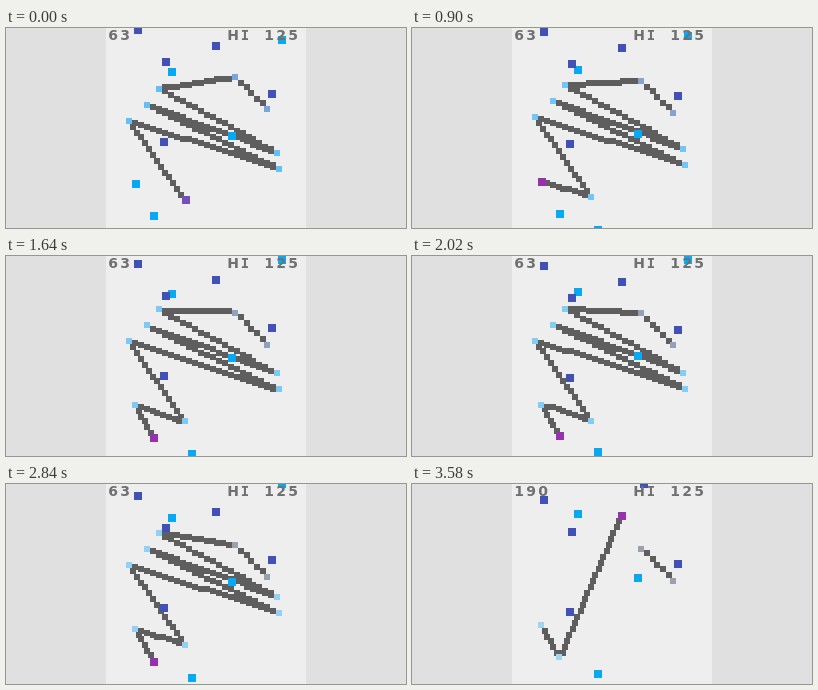
An HTML page for the animation above (3600 ms loop, 400 px wide and 200 px high).

```html
<!DOCTYPE html>
<html lang="en">
<head>
<meta charset="utf-8">
<title>Line jumper</title>
<style>
html, body { margin: 0; width: 100%; height: 100%; overflow: hidden; background: #e0e0e0; }
svg { display: block; width: 400px; height: 200px; }
path, rect { shape-rendering: crispEdges; }
text { font: bold 14px "DejaVu Sans", sans-serif; fill: #707070; text-anchor: middle; white-space: pre; }
.serif { font-family: "DejaVu Sans Mono", monospace; }
.soft { filter: blur(0.6px); }
</style>
</head>
<body>
<svg viewBox="0 0 400 200">
  <rect width="400" height="200" fill="#e0e0e0"/>
  <rect x="100" width="200" height="200" fill="#eee"/>
  <g id="gains"></g>
  <g class="soft">
    <path id="dust" fill="#686868"/>
    <path id="sparks" fill="#b05c6c"/>
    <path id="lines" fill="#5e5e5e"/>
    <path id="upNodes"/>
    <path id="downNodes"/>
    <path id="up" fill="#08a8f2"/>
    <path id="down" fill="#4251b6"/>
    <path id="player"/>
  </g>
  <text id="score" x="107 119 131" y="12"></text>
  <text x="227 239 251 263 275 287" y="12">H<tspan class="serif">I</tspan> 125</text>
</svg>
<script>
const LOOP = 3600, TICK = 20, STEP = 485;
const JUMPS = [160, 1300, 2860];
const BURST = JUMPS[2];
const UP = -1, DOWN = 1;
const $ = id => document.getElementById(id);

// One unit is two pixels. Every item drifts one unit per STEP.
const item = ([x, y, dir]) => ({ x: x + 0.25, y, dir });
const chain = [
  [131, 41, DOWN], [115, 25, DOWN], [77, 30, UP], [136, 62, UP],
  [71, 38, UP], [137, 70, UP], [62, 46, UP], [90, 86, UP],
  [65, 78, UP], [74, 94, UP], [105, 9, DOWN]
].map(item);
const blocks = [
  [66, 1, DOWN], [80, 17, DOWN], [133, 33, DOWN], [79, 57, DOWN], [116, -7, DOWN],
  [83, 22, UP], [113, 54, UP], [93, 102, UP], [138, 5.5, UP]
].map(item);
const START = 7, CUT_FROM = 1, CUT_TO = 7;

const yAt = (p, t) => p.y + 0.5 + p.dir * (t / STEP - 0.366);
const square = (x, y, size) => {
  const s = size * 2;
  return `M${Math.floor(x - size / 2) * 2} ${Math.floor(y - size / 2) * 2}h${s}v${s}h${-s}z`;
};
const at = (p, t, size) => square(p.x, yAt(p, t), size);

function line(a, b, t) {
  const ay = yAt(a, t), dx = b.x - a.x, dy = yAt(b, t) - ay;
  const n = Math.ceil(Math.max(Math.abs(dx), Math.abs(dy)) / 3);
  let d = "";
  for (let i = 0; i <= n; i++) d += square(a.x + dx * i / n, ay + dy * i / n, 3);
  return d;
}

let seed = 29;
const rand = (lo, hi) => {
  seed = (seed * 16807) % 2147483647;
  return lo + (hi - lo) * seed / 2147483647;
};

function scatter(i, density, speed) {
  const a = chain[i], b = chain[i + 1];
  const ay = yAt(a, BURST), dx = b.x - a.x, dy = yAt(b, BURST) - ay;
  const length = Math.round(Math.hypot(dx, dy) * density);
  return Array.from({ length }, () => {
    const k = rand(0, 1), angle = rand(0, Math.PI * 2), v = rand(0.4, 1) * speed;
    return {
      x: a.x + dx * k,
      y: ay + dy * k,
      vx: Math.cos(angle) * v, vy: Math.sin(angle) * v,
      life: rand(10, 20)
    };
  });
}

const gains = [], dust = [];
for (let i = CUT_FROM; i <= CUT_TO; i++) {
  const a = chain[i], b = chain[i + 1];
  const label = "+" + 2 ** (i - CUT_FROM);
  const mid = a.x + b.x;
  const el = document.createElementNS("http://www.w3.org/2000/svg", "text");
  el.textContent = label;
  el.setAttribute("x", [...label].map((c, k) => mid + (k - (label.length - 1) / 2) * 12).join(" "));
  $("gains").append(el);
  gains.push({ el, y: (yAt(a, BURST) + yAt(b, BURST)) / 2 });
  dust.push(...scatter(i, 0.26, 0.7));
}
const sparks = scatter(chain.length - 2, 0.26, 0.8);

function spray(list, n) {
  if (n < 0) return "";
  const reach = (1 - 0.98 ** n) / 0.02;
  return list.filter(p => n < p.life)
    .map(p => square(p.x + p.vx * reach, p.y + p.vy * reach, 1)).join("");
}

const mix = (a, b, k) => `rgb(${a.map((v, i) => Math.round(v + (b[i] - v) * k))})`;
const draw = (id, d) => $(id).setAttribute("d", d);
const paint = (id, color) => $(id).setAttribute("fill", color);

function render(t) {
  const head = START + JUMPS.filter(j => t >= j).length;
  const cut = t >= BURST;
  const n = (t - BURST) / TICK;
  const alive = i => i >= 0 && i < head && !(cut && i >= CUT_FROM && i <= CUT_TO);

  let lines = "";
  const nodes = { [UP]: "", [DOWN]: "" }, boxes = { [UP]: "", [DOWN]: "" };
  chain.forEach((p, i) => {
    if (alive(i)) lines += line(p, chain[i + 1], t);
    if (i < head && (alive(i) || alive(i - 1))) nodes[p.dir] += at(p, t, 3);
    if (i > head) boxes[p.dir] += at(p, t, 4);
  });
  for (const p of blocks) boxes[p.dir] += at(p, t, 4);

  draw("lines", lines);
  draw("upNodes", nodes[UP]);
  draw("downNodes", nodes[DOWN]);
  draw("up", boxes[UP]);
  draw("down", boxes[DOWN]);
  draw("player", at(chain[head], t, 4));
  draw("dust", spray(dust, n));
  draw("sparks", spray(sparks, n));

  const k = t / LOOP;
  paint("upNodes", mix([100, 191, 245], [158, 214, 240], k));
  paint("downNodes", mix([122, 164, 220], [154, 160, 174], Math.min(1, k * 1.4)));
  paint("player", head === START ? "#7650b8" : "#9533ac");

  $("score").textContent = cut ? "190" : "63";
  const rise = 20 * (1 - 0.9 ** Math.max(0, n));
  for (const g of gains) {
    g.el.setAttribute("y", Math.floor(g.y - rise) * 2 + 5);
    g.el.setAttribute("visibility", n >= 0 && n < 30 ? "visible" : "hidden");
  }
}

const begin = performance.now();
function frame() {
  const t = (performance.now() - begin) % LOOP;
  render(Math.floor(t / TICK) * TICK);
  requestAnimationFrame(frame);
}
render(0);
requestAnimationFrame(frame);
</script>
</body>
</html>
```
